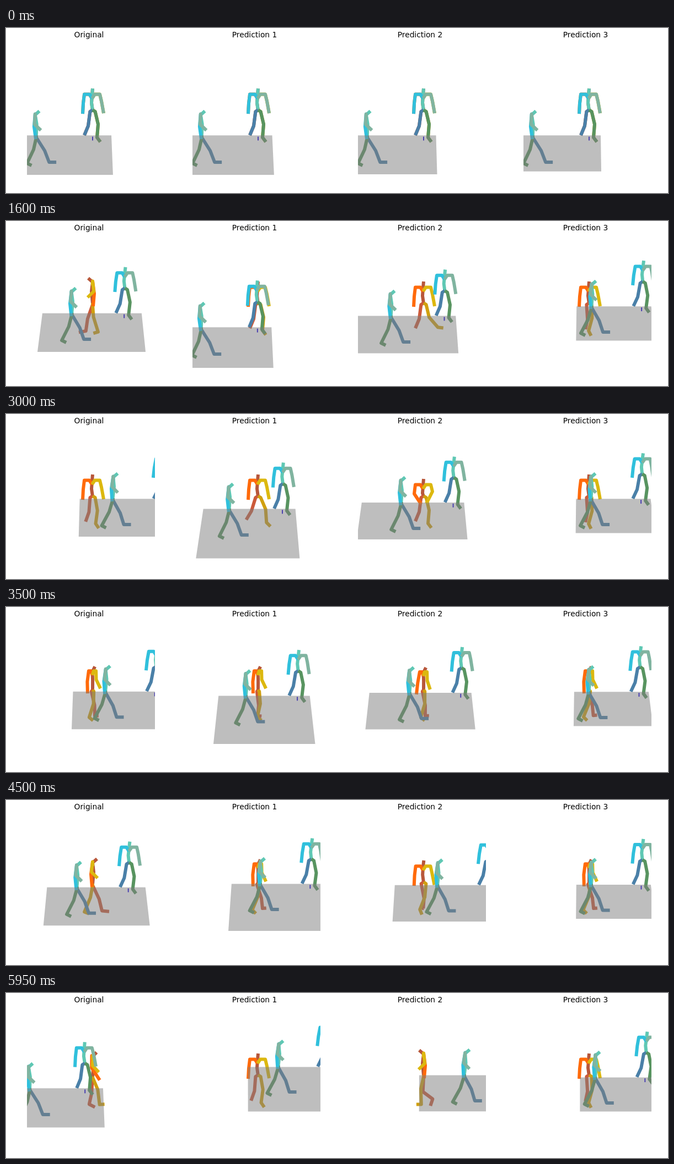
Animation of 1200x300 px, one loop 6 s. Source, as an HTML page with a canvas:

```html
<!DOCTYPE html>
<html lang="en">
<head>
<meta charset="utf-8">
<title>Motion predictions</title>
<style>
  html, body { margin: 0; width: 100%; height: 100%; overflow: hidden; background: #fff; }
  canvas, svg { position: absolute; left: 0; top: 0; width: 1200px; height: 300px; }
  text { font: 13.75px "DejaVu Sans", sans-serif; text-anchor: middle; fill: #000; }
</style>
</head>
<body>
<canvas id="stage" width="1200" height="300"></canvas>
<svg viewBox="0 0 1200 300">
  <text x="150.5" y="17">Original</text>
  <text x="450.5" y="17">Prediction 1</text>
  <text x="750.5" y="17">Prediction 2</text>
  <text x="1050.5" y="17">Prediction 3</text>
</svg>
<script>
const ctx = document.getElementById('stage').getContext('2d');
const LOOP = 6000, STEP = 50;

const cool = { spine: '#5fc8b4', armL: '#30c0dc', armR: '#80b4a0', legL: '#4a80a8', legR: '#589460' };
const warm = { spine: '#b8573a', armL: '#ff6a0a', armR: '#dcb80f', legL: '#cc5a3a', legR: '#d0a010' };

// Two basic skeletons, joints relative to the hip; every other pose is derived
const front = {
  head: [0, -40], neck: [-1, -28], waist: [-2, -14],
  elbowL: [-17, -13], handL: [-18, 6], elbowR: [16, -17], handR: [20, 5],
  kneeL: [-8, 28], ankleL: [-15, 45], toeL: [-15, 45],
  kneeR: [10, 25], ankleR: [8, 49], toeR: [14, 57]
};
const profile = {
  head: [8, -46], neck: [0, -39], waist: [2, -22],
  elbowL: [-3, -18], handL: [-1, 5], elbowR: [-2, -22], handR: [9, -11],
  kneeL: [14, 26], ankleL: [21, 47], toeL: [34, 47],
  kneeR: [-6, 24], ankleR: [-19, 49], toeR: [-11, 53]
};

const lerp = (a, b, s) => a + (b - a) * s;

function rotate(p, [cx, cy], angle) {
  const c = Math.cos(angle), s = Math.sin(angle), x = p[0] - cx, y = p[1] - cy;
  p[0] = cx + x * c + y * s;
  p[1] = cy + y * c - x * s;
}

// side: turn left or right, step: leg swing, bend: shin (left if negative), raise: arms
function body({ side = 0, step = 0, bend = 0, raise = 0 }) {
  const turn = Math.abs(side), open = 1 - turn, up = Math.max(0, raise);
  const j = { width: 14 * open };
  for (const name in front) {
    const [x, y] = front[name], [px, py] = profile[name];
    j[name] = [lerp(x, Math.sign(side) * px, turn), lerp(y, py, turn)];
  }
  for (const name of ['head', 'neck', 'waist', 'elbowL', 'handL', 'elbowR', 'handR'])
    j[name][1] += 8 * Math.abs(raise) * open;
  for (const k of ['L', 'R']) {
    j['elbow' + k][0] *= 1 + .9 * up * open;
    j['hand' + k][0] *= 1 + raise * (raise > 0 ? 1.2 : .75) * open;
    const swing = k === 'L' ? step : 1.1 * up * open - step;
    for (const name of ['knee', 'ankle', 'toe']) rotate(j[name + k], [0, 0], swing);
    const shin = Math.max(0, k === 'L' ? -bend : bend);
    for (const name of ['ankle', 'toe']) rotate(j[name + k], j['knee' + k], shin);
  }
  j.elbowL[0] += 4 * side * raise;
  j.handL[0] += 22 * side * raise;
  return j;
}

const rest = { step: .18 }, match = { side: 1 };
const times = [0, 800, 1600, 3000, 3950, 5100, 5950];

// floor: shifts of left top, left bottom, right top, right bottom, depth
// path: position of the passer-by as the view follows the actor, and the actor's pose
const panels = [
  { floor: [0, 0, 0, 0, 0], path: [
    [60, 151, {}],
    [82, 135, { side: .35, step: .1, bend: .8 }],
    [126, 122, { side: -1, step: .18 }],
    [202, 108, { step: .05 }],
    [166, 107, match],
    [98, 122, { side: 1, step: -.22 }],
    [48, 128, { side: .9, step: -.48, raise: .8 }]] },
  { floor: [5, 2.5, -8.5, -7, 17], path: [
    [60, 151, {}],
    [53, 150, {}],
    [59, 149, {}],
    [111, 127, { step: -.15 }],
    [163, 108, match],
    [174, 104, rest],
    [202, 87, { step: .05 }]] },
  { floor: [-18.5, -20, -11.5, -12.5, -2.5], path: [
    [60, 151, {}],
    [74, 137, { step: .25, bend: 1.3 }],
    [104, 127, { bend: .8 }],
    [123, 115, { raise: -1 }],
    [158, 107, match],
    [222, 110, { side: -1, step: .53 }],
    [240, 103, { side: -1, step: .45, bend: -.8 }]] },
  { floor: [30, 33, -13, -15, -6.5], path: [
    [60, 151, {}],
    [110, 130, { step: .25, raise: 1 }],
    [169, 109, rest],
    [168, 108, rest],
    [161, 108, match],
    [177, 107, rest],
    [176, 107, rest]] }
];

const slope = (path, i, c) => (path[i + 1][c] - path[i][c]) / (times[i + 1] - times[i]);

function tangent(path, i, c) {
  if (i === 0) return slope(path, 0, c);
  if (i === path.length - 1) return slope(path, i - 1, c);
  const a = slope(path, i - 1, c), b = slope(path, i, c);
  return a * b > 0 ? 2 * a * b / (a + b) : 0;
}

// Monotone cubic through the path
function curve(path, i, s, c) {
  const d = times[i + 1] - times[i], q = s * s, r = q * s;
  return (2 * r - 3 * q + 1) * path[i][c] + (3 * q - 2 * r) * path[i + 1][c] +
    d * ((r - 2 * q + s) * tangent(path, i, c) + (r - q) * tangent(path, i + 1, c));
}

// Blend two poses and add a gait that grows with the distance walked
function walk(path, i, s) {
  const [u0, , a] = path[i], [u1, , b] = path[i + 1], pose = {};
  for (const name of ['side', 'step', 'bend', 'raise'])
    pose[name] = lerp(a[name] || 0, b[name] || 0, s);
  const cycles = Math.max(1, Math.round((times[i + 1] - times[i]) / 1000));
  pose.step += .16 * Math.min(1, Math.abs(u1 - u0) / 40) * Math.sin(2 * Math.PI * cycles * s);
  return pose;
}

function figure(j, x, y, colors, shear = 0, scale = 1) {
  const line = (color, ...pts) => {
    ctx.beginPath();
    for (const [px, py] of pts) ctx.lineTo(x + px + py * shear, y + py * scale);
    ctx.strokeStyle = color;
    ctx.stroke();
  };
  const [nx, ny] = j.neck;
  const arm = (side, k) => line(colors['arm' + k], [nx, ny + 6],
    [nx + side * j.width * .35, ny - 1.5], [nx + side * j.width, ny - 1.5],
    j['elbow' + k], j['hand' + k]);
  const leg = (side, k) => line(colors['leg' + k], [0, -1], [side * j.width * .33, 2],
    j['knee' + k], j['ankle' + k], j['toe' + k]);
  line(colors.spine, j.head, j.neck, j.waist, [0, 0]);
  leg(-1, 'L');
  leg(1, 'R');
  arm(-1, 'L');
  arm(1, 'R');
}

function floor(u, v, f) {
  const du = u - 60, dv = v - 151;
  const top = v + 45 + .05 * (135 - v);
  const bottom = v + 115 + .07 * (v - 107) + f[4] * (1 + .006 * (v - 107));
  ctx.beginPath();
  ctx.moveTo(u - 60 - .11 * (u - 126) + f[0], top);
  ctx.lineTo(u + 131 + .18 * dv - .09 * du + f[2], top);
  ctx.lineTo(u + 134 + .16 * dv - .035 * du + f[3], bottom);
  ctx.lineTo(u - 69 - .055 * (u - 126) - .21 * (v - 122) + f[1], bottom);
  ctx.fillStyle = 'rgba(127,127,127,.5)';
  ctx.fill();
}

const waiting = body({}), passing = body(match);

function panel({ floor: f, path }, n, t) {
  let i = 0;
  while (i < times.length - 2 && t >= times[i + 1]) i++;
  const s = (t - times[i]) / (times[i + 1] - times[i]);
  const u = curve(path, i, s, 0), v = curve(path, i, s, 1);
  const du = u - 60, dv = v - 151;
  const shear = -.0004 * du, lean = -.0005 * (u - 160), scale = 1 + .0007 * dv;
  const bx = u + 97 + .12 * dv - .045 * du, by = v - 41 - .1 * dv;

  ctx.save();
  ctx.translate(300 * n, 0);
  ctx.beginPath();
  ctx.rect(38, 35, 232, 232);
  ctx.clip();
  ctx.lineWidth = 6;
  ctx.lineJoin = 'round';
  const pose = walk(path, i, s);
  figure(body(pose), 157, 150 + 3 * Math.max(0, pose.side), warm);
  figure(waiting, bx + 40 * shear, by + 40 * scale, cool, shear, scale);
  figure(passing, u - 7.5 + 46 * lean, v + 46, cool, lean);
  floor(u, v, f);
  ctx.fillStyle = '#4a40b0';
  ctx.fillRect(bx + 90 * shear - 1, by + 91 * scale - 3.5, 2, 7);
  ctx.restore();
}

function draw(now) {
  const t = Math.floor(now % LOOP / STEP) * STEP;
  ctx.clearRect(0, 0, 1200, 300);
  panels.forEach((p, n) => panel(p, n, t));
}

const start = performance.now();
function tick() {
  draw(performance.now() - start);
  requestAnimationFrame(tick);
}
tick();
</script>
</body>
</html>
```
